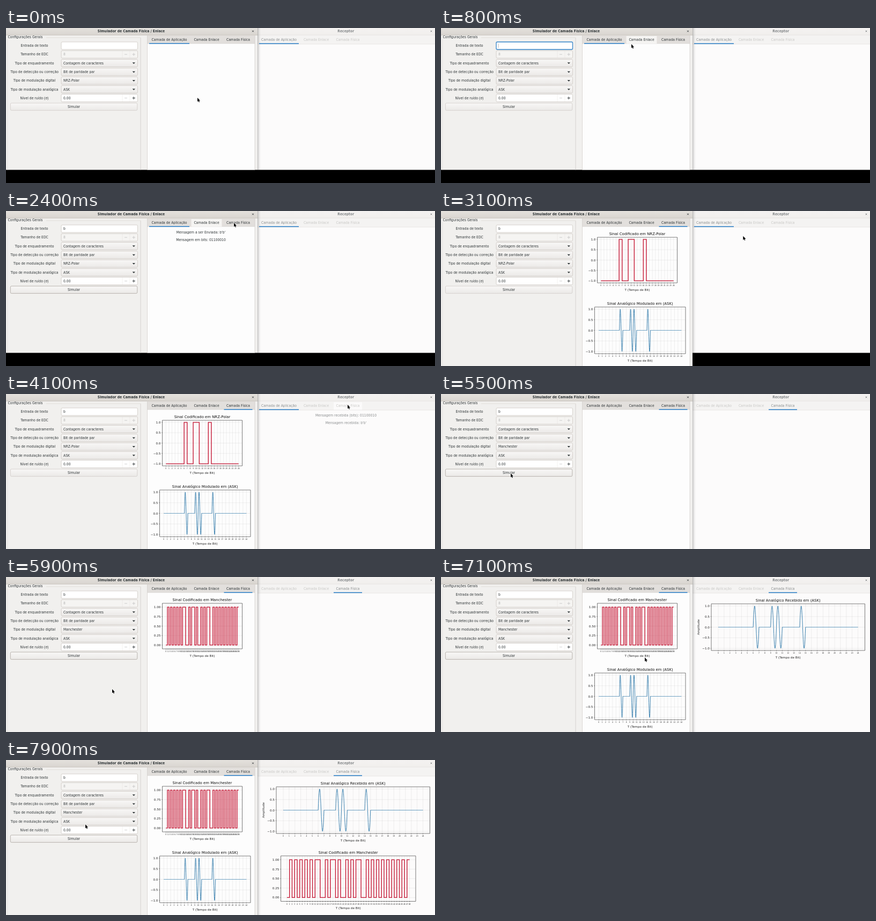
An HTML page with a canvas that plays this animation: 800x289 px, repeating every 8 s.

```html
<!DOCTYPE html>
<html lang="pt">
<head>
<meta charset="utf-8">
<title>Simulador</title>
<style>
html, body { margin: 0; width: 100%; height: 100%; overflow: hidden; background: #000; }
canvas { display: block; width: 800px; height: 289px; }
</style>
</head>
<body>
<canvas id="c" width="800" height="289"></canvas>
<script>
const g = document.getElementById('c').getContext('2d');
const LOOP = 8000, STEP = 100;
const UI = 6.07, TITLE = 6.89, LABEL = 5.7, TINY = 2.9;
const INK = '#2e3436', DIM = '#8b8e8f', FAINT = '#c9c8c6', BLUE = '#3584c8';
const RED = '#c41230', CURVE = '#3c82b0';

const BITS = '000000100110001000000000';
const PATH = [
  [0, 357, 130], [100, 325, 105], [200, 240, 58], [300, 192, 34], [400, 181, 30], [600, 182, 30],
  [700, 375, 24], [800, 355, 30], [900, 358, 85], [1000, 350, 140], [1100, 348, 145], [1200, 300, 110],
  [1400, 181, 40], [1500, 141, 80], [1600, 141, 80], [1800, 128, 147], [1900, 130, 152], [2100, 460, 110],
  [2200, 538, 40], [2300, 385, 24], [2400, 425, 22], [2600, 427, 22], [2900, 440, 80], [3200, 625, 30],
  [3400, 334, 250], [3500, 400, 225], [3600, 634, 24], [3700, 637, 20], [4200, 637, 20], [4300, 637, 23],
  [4600, 200, 100], [4700, 165, 97], [4900, 161, 95], [5100, 142, 111], [5200, 140, 111], [5400, 130, 147],
  [5500, 130, 148], [5600, 176, 176], [5700, 198, 209], [6300, 198, 209], [6600, 202, 205], [6800, 191, 200],
  [7100, 380, 150], [7500, 690, 235], [7600, 698, 247], [7700, 560, 200], [7800, 330, 100], [7900, 148, 120]
];

function pointer(t) {
  const i = PATH.findIndex(p => p[0] > t);
  if (i < 0) return PATH[PATH.length - 1].slice(1);
  const a = PATH[Math.max(0, i - 1)], b = PATH[i];
  const k = Math.max(0, (t - a[0]) / (b[0] - a[0]));
  return [a[1] + (b[1] - a[1]) * k, a[2] + (b[2] - a[2]) * k];
}

function rect(x, y, w, h, fill) {
  g.fillStyle = fill;
  g.fillRect(x, y, w, h);
}

function line(x1, y1, x2, y2, color, width = 0.5) {
  g.strokeStyle = color;
  g.lineWidth = width;
  g.beginPath();
  g.moveTo(x1, y1);
  g.lineTo(x2, y2);
  g.stroke();
}

// Set large and scaled down, so glyph advances stay exact at tiny sizes.
function text(s, x, y, { size = UI, color = INK, align = 'left', bold = false, turn = 0 } = {}) {
  g.save();
  g.translate(x, y);
  g.rotate(turn);
  g.scale(0.1, 0.1);
  g.font = `${bold ? 'bold ' : ''}${size * 10}px "DejaVu Sans", sans-serif`;
  g.textAlign = align;
  g.fillStyle = color;
  g.fillText(s, 0, size * 3.6);
  g.restore();
}

function box(x, y, w, h, fill, border, width = 0.8) {
  g.beginPath();
  g.roundRect(x, y, w, h, 2);
  g.fillStyle = fill;
  g.fill();
  g.strokeStyle = border;
  g.lineWidth = width;
  g.stroke();
}

function button(x, y, w, h, border = '#cdc7c2') {
  const shade = g.createLinearGradient(0, y, 0, y + h);
  shade.addColorStop(0, '#f8f7f6');
  shade.addColorStop(1, '#ebe9e7');
  box(x, y, w, h, shade, border);
}

function chart({ l, r, top, bottom, title, analog, manchester, ylabel }) {
  const w = r - l, h = bottom - top, mid = (l + r) / 2;
  const n = manchester ? 48 : 24;
  const lo = manchester ? -0.1 : -1.1, hi = manchester ? 1.1 : 1.1;
  const px = v => l + w * (1 / 22 + v / n * 20 / 22);
  const py = v => bottom - h * (v - lo) / (hi - lo);

  text(title, mid, top - 6, { size: TITLE, color: '#111', align: 'center' });
  for (let i = 0; i <= n; i++) {
    line(px(i), top, px(i), bottom, 'rgba(0,0,0,.15)', 0.4);
    line(px(i), bottom, px(i), bottom + 1.6, '#222', 0.4);
    text(String(i), px(i), bottom + 5.2, { size: TINY, color: '#222', align: 'center' });
  }
  for (let i = 0; i < 5; i++) {
    const v = manchester ? i / 4 : i / 2 - 1;
    const s = Math.abs(v).toFixed(manchester ? 2 : 1);
    line(l, py(v), r, py(v), 'rgba(0,0,0,.15)', 0.4);
    line(l - 1.6, py(v), l, py(v), '#222', 0.4);
    text((v < 0 ? '\u2212' : '') + s, l - 3, py(v), { size: LABEL, color: '#222', align: 'right' });
  }
  text('T (Tempo de Bit)', mid, bottom + 12.6, { size: LABEL, color: '#222', align: 'center' });
  if (ylabel) text(ylabel, 480, (top + bottom) / 2, { size: LABEL, color: '#222', align: 'center', turn: -Math.PI / 2 });

  g.beginPath();
  if (analog) {
    for (let i = 0; i <= 24 * 20; i++) {
      const v = i / 20;
      g.lineTo(px(v), py(BITS[Math.floor(v)] === '1' ? Math.sin(2 * Math.PI * v) : 0));
    }
  } else {
    for (let i = 0; i < n; i++) {
      const v = manchester ? BITS[i >> 1] ^ (i & 1) : BITS[i] * 2 - 1;
      g.lineTo(px(i), py(v));
      g.lineTo(px(i + 1), py(v));
    }
  }
  g.strokeStyle = analog ? CURVE : RED;
  g.lineWidth = analog ? 1 : 1.35;
  g.lineJoin = 'round';
  g.stroke();
  g.strokeStyle = '#222';
  g.lineWidth = 0.6;
  g.strokeRect(l, top, w, h);
}

const TABS = ['Camada de Aplicação', 'Camada Enlace', 'Camada Física'];
const MAIN_TABS = [[267, 342], [345.5, 402.5], [406.5, 459.5]];
const RX_TABS = [[472, 546], [550, 607], [611, 664]];

function tabs(spans, y, current, active, [hx, hy]) {
  spans.forEach(([a, b], i) => {
    if (i !== current && hx >= a && hx <= b && hy > 14 && hy < 31) {
      rect(a, y - 7, b - a, 14, active ? '#f5f4f2' : '#fbfafa');
    }
    const color = active ? INK : i === current ? DIM : FAINT;
    text(TABS[i], (a + b) / 2, y, { color, align: 'center' });
    if (i === current) rect(a, y + 6, b - a, 1.6, BLUE);
  });
}

function titleBar(x, w, name, mid, active) {
  const shade = g.createLinearGradient(0, 0, 0, 13);
  shade.addColorStop(0, active ? '#e4e1dd' : '#f4f2f1');
  shade.addColorStop(1, active ? '#d9d5d0' : '#f1efed');
  rect(x, 0, w, 13, shade);
  line(x, 13.3, x + w, 13.3, active ? '#bfb8b1' : '#d8d4d0', 0.7);
  const color = active ? INK : '#85888a';
  text(name, mid, 6, { color, align: 'center', bold: true });
  const cx = x + w - (x ? 7 : 8.5);
  line(cx - 1.4, 4.6, cx + 1.4, 7.4, color, 0.9);
  line(cx - 1.4, 7.4, cx + 1.4, 4.6, color, 0.9);
}

function spin(y, value, enabled, fg) {
  box(103, y - 7, 142.5, 14, enabled ? '#fff' : '#f5f4f2', '#cdc7c2');
  text(value, 107, y, { color: enabled ? fg : '#b5b5b5' });
  line(217, y - 6.5, 217, y + 6.5, '#e4e1de');
  line(231, y - 6.5, 231, y + 6.5, '#e4e1de');
  line(221, y, 226, y, '#c4c4c4', 0.8);
  const plus = enabled ? fg : '#c8c8c8';
  line(235.5, y, 241, y, plus, 0.9);
  line(238.2, y - 2.7, 238.2, y + 2.7, plus, 0.9);
}

function combo(y, value, fg) {
  button(103, y - 7, 142.5, 14);
  text(value, 107, y, { color: fg });
  g.fillStyle = fg;
  g.beginPath();
  g.moveTo(235.6, y - 1.2);
  g.lineTo(241, y - 1.2);
  g.lineTo(238.3, y + 1.6);
  g.fill();
}

function form(s) {
  line(251, 18, 251, s.mainBottom, '#d3cfcb', 0.9);
  line(75, 18, 251, 18, '#d8d4d0', 0.7);
  line(3, 21, 3, s.mainBottom, '#dedad7', 0.6);
  text('Configurações Gerais', 3.5, 17.3, { color: s.fg });
  const rows = ['Entrada de texto', 'Tamanho de EDC', 'Tipo de enquadramento', 'Tipo de detecção ou correção',
    'Tipo de modulação digital', 'Tipo de modulação analógica', 'Nível de ruído (σ)'];
  rows.forEach((name, i) => text(name, 53, 33 + i * 16.28, { color: s.fg, align: 'center' }));

  box(103, 26, 142.5, 14, '#fff', s.focused ? BLUE : '#cdc7c2', s.focused ? 1.3 : 0.8);
  if (s.typed) text('b', 107, 33, { color: s.fg });
  if (s.focused) line(s.typed ? 111.5 : 107.2, 29, s.typed ? 111.5 : 107.2, 37, '#777', 0.5);
  spin(49.2, '8', false, s.weak);
  combo(65.5, 'Contagem de caracteres', s.weak);
  combo(81.9, 'Bit de paridade par', s.weak);
  combo(98.1, s.digital, s.weak);
  combo(114.4, 'ASK', s.weak);
  spin(130.6, '0.00', true, s.weak);
  button(8.3, 140, 236.5, 13.6, s.pressed ? '#aaa49e' : '#d0cbc7');
  text('Simular', 126.5, 146.9, { color: s.weak, align: 'center' });
}

function popup(pick) {
  rect(102.5, 92.3, 143.5, 38, '#fff');
  g.strokeStyle = '#cdc7c2';
  g.lineWidth = 0.6;
  g.strokeRect(102.5, 92.3, 143.5, 38);
  ['NRZ-Polar', 'Manchester', 'Bipolar'].forEach((name, i) => {
    const y = 99 + i * 12.5;
    if (i === pick) rect(102.8, y - 6.2, 143, 12.5, '#2a77c4');
    text(name, 106.5, y, { color: i === pick ? '#fff' : INK });
  });
}

function receiver(s) {
  rect(469, 0, 331, s.rxBottom, '#fcfbfb');
  titleBar(469, 331, 'Receptor', 633.7, s.rxActive);
  rect(469, 13.7, 331, 16.3, s.rxActive ? '#e2dfdc' : '#f4f3f2');
  line(469, 30, 800, 30, '#dedbd8', 0.6);
  tabs(RX_TABS, 22.3, s.rxTab, s.rxActive, s.hover);
  if (s.rxTab === 0 && s.received) {
    text('Mensagem recebida (bits): 01100010', 634, 40, { color: DIM, align: 'center' });
    text("Mensagem recebida: b'b'", 634, 54, { color: DIM, align: 'center' });
  }
  if (s.rxPlots > 0) {
    chart({ l: 504, r: 790.5, top: 50, bottom: 137, title: 'Sinal Analógico Recebido em (ASK)', analog: true, ylabel: 'Amplitude' });
  }
  if (s.rxPlots > 1) {
    chart({ l: 512.5, r: 764, top: 178.8, bottom: 263.5, title: 'Sinal Codificado em ' + s.digital, manchester: s.manchester });
  }
}

function sender(s) {
  const h = s.mainBottom;
  const shadow = g.createLinearGradient(468, 0, 475, 0);
  shadow.addColorStop(0, 'rgba(0,0,0,.38)');
  shadow.addColorStop(0.4, 'rgba(0,0,0,.1)');
  shadow.addColorStop(1, 'rgba(0,0,0,0)');
  rect(468, 0, 7, h, shadow);
  rect(0, 0, 469, h, '#f1f0ee');
  titleBar(0, 469, 'Simulador de Camada Física / Enlace', 233.5, s.mainActive);
  form(s);

  rect(263.5, 14, 200.5, h - 14, '#fdfdfd');
  rect(263.5, 14, 200.5, 15, '#e2dfdc');
  line(263.5, 29, 464, 29, '#cfcac6', 0.6);
  line(263.5, 14, 263.5, h, '#d0cbc7', 0.7);
  line(464, 14, 464, h, '#d0cbc7', 0.7);
  tabs(MAIN_TABS, 22, s.mainTab, s.mainActive, s.hover);
  if (s.mainTab === 0 && s.sent) {
    text("Mensagem a ser Enviada: b'b'", 363.5, 39.8, { color: s.fg, align: 'center' });
    text('Mensagem em bits: 01100010', 363.5, 53.6, { color: s.fg, align: 'center' });
  }
  if (s.mainPlots > 0) {
    chart({ l: 291.5, r: 440.5, top: 49, bottom: 134, title: 'Sinal Codificado em ' + s.digital, manchester: s.manchester });
  }
  if (s.mainPlots > 1) {
    chart({ l: 286.5, r: 456, top: 179, bottom: 266, title: 'Sinal Analógico Modulado em (ASK)', analog: true });
  }
  if (s.open) popup(s.pick);
}

function drawPointer([x, y]) {
  if (x > 104 && x < 245 && y > 26 && y < 40) {
    line(x, y - 5, x, y + 5, '#111', 0.9);
    line(x - 2, y - 5.3, x + 2, y - 5.3, '#111', 0.8);
    line(x - 2, y + 5.3, x + 2, y + 5.3, '#111', 0.8);
    return;
  }
  const shape = [[0, 0], [0, 7.4], [1.7, 5.9], [2.8, 8.4], [4, 7.9], [2.9, 5.5], [5.1, 5.4]];
  g.beginPath();
  shape.forEach(([a, b]) => g.lineTo(x + a, y + b));
  g.closePath();
  g.lineJoin = 'round';
  g.strokeStyle = '#fff';
  g.lineWidth = 1.3;
  g.stroke();
  g.fillStyle = '#000';
  g.fill();
}

function stateAt(t) {
  const within = (a, b) => t >= a && t < b;
  const plots = (first, second, end) => within(first, end) ? (t >= second ? 2 : 1) : 0;
  const rxActive = within(4200, 4700);
  const open = within(4800, 5200);
  const again = t >= 5200;
  return {
    hover: pointer(Math.max(0, t - STEP)),
    focused: within(600, 1800),
    typed: t >= 1100,
    pressed: within(1800, 2600) || t >= 5500,
    sent: t >= 1900,
    received: t >= 3900,
    mainActive: !rxActive,
    rxActive,
    open,
    pick: t < 5000 ? 0 : 1,
    fg: rxActive ? DIM : INK,
    weak: rxActive || open ? DIM : INK,
    digital: again ? 'Manchester' : 'NRZ-Polar',
    manchester: t >= 5500,
    mainTab: t >= 2600 ? 2 : 0,
    rxTab: t >= 4200 ? 2 : 0,
    mainPlots: plots(2700, 2900, 5500) || plots(5900, 6200, LOOP),
    rxPlots: plots(4300, 4500, 5500) || plots(6900, 7200, LOOP),
    mainBottom: t >= 2700 ? 289 : 264.5,
    rxBottom: t >= 3900 ? 289 : 264.5
  };
}

function draw(t) {
  const s = stateAt(t);
  // The charts keep their old heading until they are simulated again.
  const shown = { ...s, digital: s.manchester ? 'Manchester' : 'NRZ-Polar' };
  rect(0, 0, 800, 289, '#000');
  receiver(shown);
  sender(shown);
  if (s.digital !== shown.digital) combo(98.1, s.digital, s.weak);
  drawPointer(pointer(t));
}

let last = -1;
function tick() {
  const t = Math.floor(performance.now() % LOOP / STEP) * STEP;
  if (t !== last) draw(last = t);
  requestAnimationFrame(tick);
}
tick();
</script>
</body>
</html>
```
